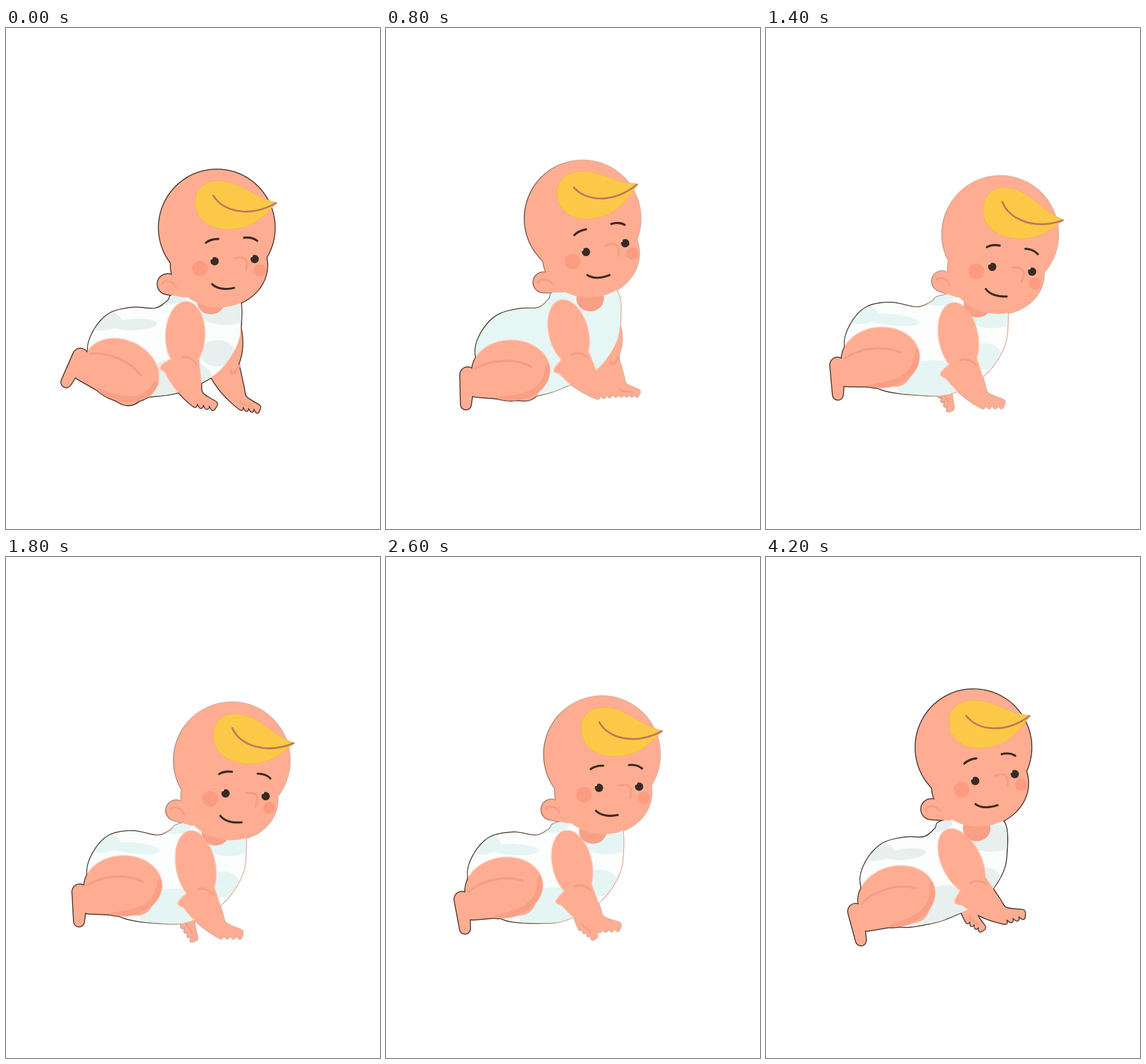
Recreate the animation shown at these times as an HTML page with a canvas. Size 597x798 px, loop 4.8 s.

```html
<!DOCTYPE html>
<html lang="en">
<head>
<meta charset="utf-8">
<title>Crawling baby</title>
<style>
html, body { margin: 0; width: 100%; height: 100%; overflow: hidden; background: #fff; }
canvas { display: block; width: 597px; height: 798px; }
</style>
</head>
<body>
<canvas id="stage" width="597" height="798"></canvas>
<script>
const ctx = document.getElementById('stage').getContext('2d');
const LOOP = 4800;
const SKIN = '#ffad92', FOLD = '#f29f85', SHADE = '#f8a086', RIM = '#fbd2c3';
const DARK = '#49372f', PALE = '#dfb3a2', INK = '#3a2a23', CHEEK = '#fb9b80';

// Main poses; turn swings the leg. Torso, shoulders and elbows follow by rule.
const KEYS = [
  { at: 0, head: [365, 369.5], tilt: 0, hip: [0, 0], turn: 25, hand: [320, 598], rear: [391, 603], dark: true },
  { at: 800, head: [350.5, 349.5], tilt: -9.5, hip: [12, 3], turn: 0, hand: [355, 580], rear: [391, 580], flat: true },
  { at: 1200, head: [373.5, 374.5], tilt: 5.6, hip: [-6, -9], turn: -5, hand: [366, 594], rear: [287, 592], dark: true, flat: true },
  { at: 1400, head: [393, 384], tilt: 10, hip: [-5, -10], turn: -4, hand: [364, 597], rear: [290, 596] },
  { at: 1800, head: [382.5, 378.5], tilt: 7, hip: [-1, -11], turn: -2, hand: [361, 599], rear: [295, 598] },
  { at: 2600, head: [372, 366.5], tilt: 1.4, hip: [0, -8], turn: -9.5, hand: [358, 588], rear: [325, 597] },
  { at: 3400, head: [370.5, 360.5], tilt: -4.3, hip: [17, 2], turn: -9, hand: [385, 583], rear: [339, 594], dark: true, flat: true },
  { at: 4200, head: [365.5, 351], tilt: -6.7, hip: [20, 2], turn: -14, hand: [397, 571], rear: [337, 585], dark: true }
];
// The picture steps: even at first, then with longer holds
const SHOTS = [...Array(10).keys()].map(i => i * 200).concat(2200, 2400, 2600, 3000, 3400, 4200);

const TORSO = [[131, 518], [139, 484], [165, 455], [202, 446], [238, 449], [258, 438], [270, 427],
  [335, 415], [371, 430], [375, 478], [366, 515], [335, 555], [285, 581], [245, 588], [190, 586], [150, 560]];
const BANDS = [[205, 473, 36, 9], [150, 466, 34, 16], [255, 430, 34, 14], [350, 455, 42, 22],
  [338, 522, 28, 21], [272, 572, 62, 42]];

const lerp = (a, b, t) => a + (b - a) * t;
const between = (p, q, t) => p.map((v, i) => lerp(v, q[i], t));

function poseAt(time) {
  const shot = SHOTS.filter(s => s <= time).pop();
  const i = KEYS.filter(k => k.at <= shot).length - 1;
  const a = KEYS[i], b = KEYS[i + 1] || a;
  const t = a === b ? 0 : ((shot - a.at) / (b.at - a.at)) ** 2;
  const pose = { ...a };
  for (const k of ['head', 'hip', 'hand', 'rear']) pose[k] = between(a[k], b[k], t);
  for (const k of ['tilt', 'turn']) pose[k] = lerp(a[k], b[k], t);
  return pose;
}

// Closed smooth curve through all points
function blob(pts) {
  const p = new Path2D(), n = pts.length;
  p.moveTo(...pts[0]);
  for (let i = 0; i < n; i++) {
    const [a, b, c, d] = [n - 1, 0, 1, 2].map(k => pts[(i + k) % n]);
    p.bezierCurveTo(b[0] + (c[0] - a[0]) / 6, b[1] + (c[1] - a[1]) / 6,
      c[0] - (d[0] - b[0]) / 6, c[1] - (d[1] - b[1]) / 6, ...c);
  }
  return p;
}

function oval(at, x, y, rx, ry = rx) {
  const pts = [];
  for (let i = 0; i < 20; i++) {
    const a = i * Math.PI / 10;
    pts.push(at([x + rx * Math.cos(a), y + ry * Math.sin(a)]));
  }
  return blob(pts);
}

// Capsule between two circles of different size
function taper([ax, ay], ra, [bx, by], rb) {
  const dir = Math.atan2(by - ay, bx - ax);
  const lean = Math.acos((ra - rb) / Math.hypot(bx - ax, by - ay));
  const p = new Path2D();
  p.arc(ax, ay, ra, dir + lean, dir - lean + 2 * Math.PI);
  p.arc(bx, by, rb, dir - lean, dir + lean);
  p.closePath();
  return p;
}

function turned([x, y], deg, ox = 0, oy = 0) {
  const r = deg * Math.PI / 180, c = Math.cos(r), s = Math.sin(r);
  return ([px, py]) => [x + (px - ox) * c - (py - oy) * s, y + (px - ox) * s + (py - oy) * c];
}

// Maps (along, across) to the bone from a to b
function bone([ax, ay], [bx, by], size, wide) {
  const len = Math.hypot(bx - ax, by - ay), ux = (bx - ax) / len, uy = (by - ay) / len;
  return ([s, w]) => {
    const along = s * len / size, across = w * wide;
    return [ax + ux * along + uy * across, ay + uy * along - ux * across];
  };
}

// Forearm narrowing to the wrist, then four fingers
function forearm(at) {
  const left = [], right = [], fingers = [];
  for (let u = 0; u <= 1; u += .2) {
    const s = lerp(-10, 64, u), mid = -3 - 9 * Math.sin(u * 1.57), half = 31 - 17 * u ** 1.5;
    left.push([s, mid - half]);
    right.unshift([s, mid + half]);
  }
  for (let i = 0; i < 4; i++) {
    const [x, y] = between([79, -18], [98, 5], i / 3);
    fingers.push([x, y - 2], [x + 1, y + 2]);
    if (i < 3) fingers.push([x - 2, y + 5]);
  }
  return blob([...left, ...fingers, [92, 15], [78, 8], ...right].map(at));
}

function armParts(shoulder, hand, wide) {
  const [dx, dy] = [hand[0] - shoulder[0], hand[1] - shoulder[1]], len = Math.hypot(dx, dy);
  const [mx, my] = between(shoulder, hand, .45);
  const elbow = [mx - 18 * dy / len, my + 18 * dx / len];
  const at = bone(elbow, hand, 84, wide);
  return { at, paths: [oval(bone(shoulder, elbow, 63, wide), 24, 1, 52, 31), forearm(at)] };
}

function fill(path, color) {
  ctx.fillStyle = color;
  ctx.fill(path);
}

function stroke(path, color, width) {
  ctx.strokeStyle = color;
  ctx.lineWidth = width;
  ctx.stroke(path);
}

function curve(at, pts, color, width) {
  const [a, b, c, d] = pts.map(at), p = new Path2D();
  p.moveTo(...a);
  p.bezierCurveTo(...b, ...c, ...d);
  stroke(p, color, width);
}

function within(path, paint) {
  ctx.save();
  ctx.clip(path);
  paint();
  ctx.restore();
}

function drawFace(at) {
  const hair = new Path2D();
  const h = [[432, 278], [397, 272], [375, 243], [338, 243], [315, 243], [302, 258], [302, 277],
    [302, 305], [325, 321], [355, 321], [392, 321], [412, 301], [432, 278]].map(at);
  hair.moveTo(...h[0]);
  for (let i = 1; i < h.length; i += 3) hair.bezierCurveTo(...h[i], ...h[i + 1], ...h[i + 2]);
  fill(hair, '#fcc847');
  stroke(hair, '#eeb071', 1);
  curve(at, [[331, 267], [346, 292], [388, 303], [431, 279]], '#b97b5c', 3);

  fill(oval(at, 309.5, 383, 12.5), CHEEK);
  fill(oval(at, 405, 386, 9.5), CHEEK);
  curve(at, [[365, 367], [382, 362], [388, 370], [383, 386]], FOLD, 3.5);
  curve(at, [[249, 407], [254, 401], [265, 402], [271, 412]], FOLD, 3.5);
  curve(at, [[319, 342], [324, 338], [331, 336], [339, 336]], INK, 3.4);
  curve(at, [[380, 334], [388, 333], [395, 334], [401, 339]], INK, 3.4);
  curve(at, [[329, 408], [337, 416], [351, 417], [364, 414]], INK, 3.3);
  for (const [x, y] of [[333, 371.5], [397, 368]]) {
    fill(oval(at, x, y, 6.6), INK);
    fill(oval(at, x - 5, y - 4.5, 1.7), '#f6d8c6');
  }
}

function draw(time) {
  const { head, tilt, hip, turn, hand, rear, dark, flat } = poseAt(time);
  const chest = [.45 * (hip[0] + head[0] - 365), .5 * tilt - 4];

  // Torso points follow the hip on the left and the chest on the right
  const skin = ([x, y]) => {
    const [dx, dy] = between(hip, chest, Math.min(1, Math.max(0, (x - 190) / 90)));
    return [x + dx, y + dy];
  };
  const headAt = turned(head, tilt, 365, 369.5);
  const legAt = turned([175.5 + hip[0], 536 + 1.5 * hip[1]], turn);
  const front = armParts([286 + 1.5 * chest[0], 467 + .6 * chest[1]], hand, 1);
  const back = armParts([350 + chest[0], 480 + chest[1]], rear, .84);

  const torso = blob(TORSO.map(skin));
  const thigh = oval(legAt, 12, 5, 62, 48);
  const leg = [thigh, taper(legAt([34, 27]), 26, legAt([-42, 26]), 21),
    taper(legAt([-57, 12]), 12, legAt([-60, 59]), 8)];
  const skull = [oval(headAt, 336.5, 318, 92.5), oval(headAt, 340, 378, 77, 67),
    taper(headAt([258, 408]), 16, headAt([285, 414]), 15)];

  ctx.fillStyle = '#fff';
  ctx.fillRect(0, 0, 597, 798);
  ctx.lineCap = ctx.lineJoin = 'round';

  // Outer edge first; the fills hide its inner parts
  const edge = ctx.createLinearGradient(200, 0, 300, 0);
  edge.addColorStop(0, DARK);
  edge.addColorStop(1, dark ? DARK : PALE);
  for (const p of [...back.paths, torso, ...leg, ...front.paths, ...skull]) stroke(p, edge, 3);

  for (const p of back.paths) fill(p, SKIN);
  curve(back.at, [[10, 4], [20, -4], [18, 12], [12, 22]], FOLD, 4);
  curve(back.at, [[66, -12], [76, -16], [76, -2], [86, 2]], FOLD, 3);

  fill(torso, flat ? '#e6f6f5' : '#fbfefd');
  within(torso, () => {
    if (!flat) for (const b of BANDS) fill(oval(skin, ...b), dark ? '#e7f0ee' : '#e5f5f4');
    for (const p of [thigh, ...front.paths]) stroke(p, RIM, 3);
  });

  for (const p of leg) fill(p, SKIN);
  within(thigh, () => curve(legAt, [[76, 4], [72, 38], [46, 53], [-5, 56]], SHADE, 20));
  curve(legAt, [[-45, 2], [-20, -13], [18, -15], [44, -1]], FOLD, 3.6);

  fill(oval(skin, 327, 440, 22, 20), SHADE);
  for (const p of front.paths) fill(p, SKIN);
  curve(front.at, [[-6, 0], [-4, 7], [4, 14], [17, 15]], FOLD, 3.4);

  for (const p of skull) fill(p, SKIN);
  drawFace(headAt);
}

const start = performance.now();
function tick() {
  draw((performance.now() - start) % LOOP);
  requestAnimationFrame(tick);
}
tick();
</script>
</body>
</html>
```
